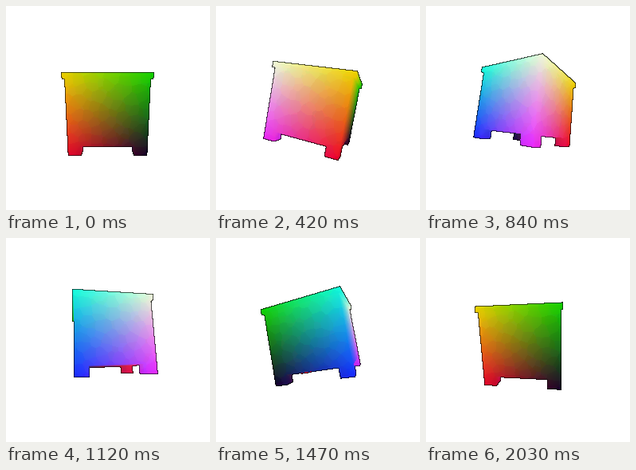
Write an HTML page with a canvas that moves like this. It is 256 by 256 pixels and loops after 2.1 s.

```html
<!DOCTYPE html>
<html>
<head>
<meta charset="utf-8">
<title>Turning crate</title>
<style>
html, body { margin: 0; width: 100%; height: 100%; overflow: hidden; background: #fff; }
canvas { display: block; width: 100vw; height: 100vh; image-rendering: pixelated; }
</style>
</head>
<body>
<canvas id="stage" width="256" height="256"></canvas>
<script>
const SIZE = 256, MID_X = 127.5, MID_Y = 128, DIST = 205;
const STEPS = 30, STEP_MS = 70;
const TILT = 10.8 * Math.PI / 180;
const TC = Math.cos(TILT), TS = Math.sin(TILT);
const AREA = { x0: 52, y0: 56, x1: 204, y1: 200 };

const ctx = document.getElementById('stage').getContext('2d');
const img = ctx.createImageData(SIZE, SIZE);

// Boxes as [min x, y, z, max x, y, z]
const LID_X = 43.2, LID_Z = 44.6, SIDE_X = 41.2, SIDE_Z = 42.4;
const TOP = 42.5, RIM = 36.8, FLOOR = -32.5, FOOT = 13.5;
const boxes = [
  [-LID_X, RIM, -LID_Z, LID_X, TOP, LID_Z],
  [-SIDE_X, FLOOR, -SIDE_Z, SIDE_X, RIM, SIDE_Z]
];
for (const x of [-SIDE_X, SIDE_X - FOOT])
  for (const z of [-SIDE_Z, SIDE_Z - FOOT])
    boxes.push([x, -TOP, z, x + FOOT, FLOOR, z + FOOT]);

// Jittered sites give the surface its faint facets
const CELL = 9, GRID = 13, HALF = GRID * CELL / 2;
const sites = [];
let seed = 7;
function rand() {
  seed = (seed * 16807) % 2147483647;
  return seed / 2147483647;
}
for (let k = 0; k < GRID; k++)
  for (let j = 0; j < GRID; j++)
    for (let i = 0; i < GRID; i++)
      sites.push([i, j, k].map(n => (n + rand()) * CELL - HALF));

function nearestSite(p) {
  const [ci, cj, ck] = p.map(v => Math.floor((v + HALF) / CELL));
  let best = Infinity, found = p;
  for (let k = Math.max(0, ck - 1); k <= Math.min(GRID - 1, ck + 1); k++)
    for (let j = Math.max(0, cj - 1); j <= Math.min(GRID - 1, cj + 1); j++)
      for (let i = Math.max(0, ci - 1); i <= Math.min(GRID - 1, ci + 1); i++) {
        const s = sites[(k * GRID + j) * GRID + i];
        const d = (s[0] - p[0]) ** 2 + (s[1] - p[1]) ** 2 + (s[2] - p[2]) ** 2;
        if (d < best) { best = d; found = s; }
      }
  return found;
}

function toCrate(x, y, z, c, s) {
  const u = x * c - z * s, w = x * s + z * c;
  return [u, y * TC + w * TS, w * TC - y * TS];
}

function hitBox(o, d, b) {
  let near = 0, far = Infinity;
  for (let a = 0; a < 3; a++) {
    const inv = 1 / (d[a] || 1e-9);
    const t1 = (b[a] - o[a]) * inv, t2 = (b[a + 3] - o[a]) * inv;
    near = Math.max(near, Math.min(t1, t2));
    far = Math.min(far, Math.max(t1, t2));
  }
  return near <= far ? near : Infinity;
}

function trace(o, d) {
  let t = Infinity;
  for (const b of boxes) t = Math.min(t, hitBox(o, d, b));
  return t;
}

// Colour follows position in a 100-unit cube standing upright around the crate
function colourAt(p) {
  const site = nearestSite(p);
  const [x, y, z] = p.map((v, a) => v + (site[a] - v) * 0.3);
  const up = y * TC - z * TS, out = y * TS + z * TC;
  return [-x, up, -out].map(v => 0.5 + v / 100);
}

function draw(angle) {
  const c = Math.cos(angle), s = Math.sin(angle);
  const eye = toCrate(0, 0, DIST, c, s);
  const px = img.data;
  px.fill(255);
  for (let y = AREA.y0; y < AREA.y1; y++) {
    for (let x = AREA.x0; x < AREA.x1; x++) {
      let hits = 0, point = null;
      for (let n = 0; n < 4; n++) {
        const sx = x + (n & 1), sy = y + (n >> 1);
        const ray = toCrate(sx - MID_X, MID_Y - sy, -DIST, c, s);
        const t = trace(eye, ray);
        if (t < Infinity) {
          hits++;
          point = eye.map((v, a) => v + ray[a] * t);
        }
      }
      if (!hits) continue;
      // Partly covered pixels fade to black and form the outline
      const rgb = colourAt(point), i = (y * SIZE + x) * 4;
      const cover = (hits / 4) ** 1.5;
      for (let a = 0; a < 3; a++) px[i + a] = rgb[a] * 255 * cover;
    }
  }
  ctx.putImageData(img, 0, 0);
}

let shown = -1;
const start = performance.now();
function tick() {
  const step = Math.floor((performance.now() - start) / STEP_MS) % STEPS;
  if (step !== shown) {
    shown = step;
    draw(step / STEPS * 2 * Math.PI);
  }
  requestAnimationFrame(tick);
}
tick();
</script>
</body>
</html>
```
